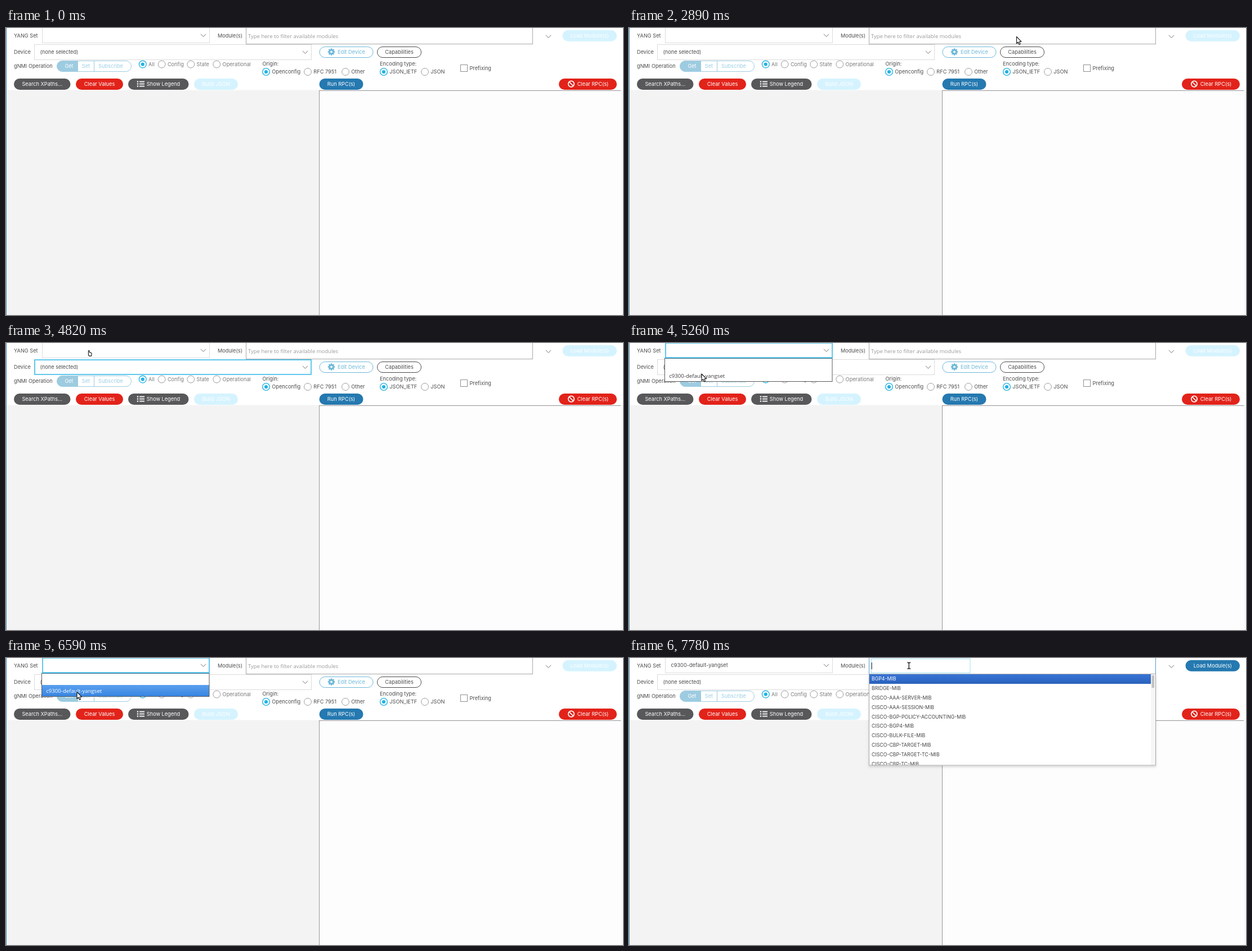
Animation, 1096 px wide and 511 px high, one loop 8 s. Source, as an HTML page with a canvas:

```html
<!DOCTYPE html>
<html lang="en">
<head>
<meta charset="utf-8">
<title>gNMI form</title>
<style>
html, body { margin: 0; width: 100%; height: 100%; overflow: hidden; background: #fff; }
canvas { display: block; }
</style>
</head>
<body>
<canvas id="stage"></canvas>
<script>
const W = 1096, H = 511, LOOP = 8000;
const canvas = document.getElementById('stage');
const ctx = canvas.getContext('2d');
const ratio = window.devicePixelRatio || 1;
canvas.width = W * ratio;
canvas.height = H * ratio;
canvas.style.width = W + 'px';
canvas.style.height = H + 'px';

const UI = '9.2px Inter, sans-serif';
const LIST = '8.75px Inter, sans-serif';
const NATIVE = '9.6px "Open Sans", sans-serif';
const HINT = '9.47px "Open Sans", sans-serif';
const INK = '#4d4d4f', DARK = '#58585b', RED = '#e2231a', BLUE = '#2579b0';
const CYAN = '#4fc3ea', PALE = '#d5f3ff', SOFT = '#6cb8d8', GREY = '#a9a9a9';
const YANG_SET = 'c9300-default-yangset';
const MODULES = ['BGP4-MIB', 'BRIDGE-MIB', 'CISCO-AAA-SERVER-MIB', 'CISCO-AAA-SESSION-MIB',
  'CISCO-BGP-POLICY-ACCOUNTING-MIB', 'CISCO-BGP4-MIB', 'CISCO-BULK-FILE-MIB',
  'CISCO-CBP-TARGET-MIB', 'CISCO-CBP-TARGET-TC-MIB', 'CISCO-CBP-TC-MIB'];

const OPEN = 4970, HOVER = 6450, CHOSEN = 6740, SEARCH = 7780;

// Pointer: start time, shape, hot spot
const POINTER = [
  [0], [2890, arrow, 688.5, 15.5], [3035, arrow, 244, 207], [3180],
  [4520, hand, 165, 38], [4670, hand, 155, 26], [4820, hand, 147, 12.5],
  [5115, arrow, 140, 35], [5260, arrow, 129, 55], [5410, arrow, 126, 60.5],
  [6890], [7180, beam, 491, 6], [7330, beam, 497.3, 13.7]
];

function text(str, x, y, color = INK, font = UI, align = 'left') {
  ctx.font = font;
  ctx.textAlign = align;
  ctx.fillStyle = color;
  ctx.fillText(str, x, y);
}

function rect(x, y, w, h, color) {
  ctx.fillStyle = color;
  ctx.fillRect(x, y, w, h);
}

function frame(x, y, w, h, color, width = 1) {
  ctx.strokeStyle = color;
  ctx.lineWidth = width;
  ctx.strokeRect(x, y, w, h);
}

function line(points, color, width = 1) {
  ctx.beginPath();
  points.forEach(([x, y]) => ctx.lineTo(x, y));
  ctx.strokeStyle = color;
  ctx.lineWidth = width;
  ctx.stroke();
}

function shape(points, x, y, fill, stroke, width = 1) {
  ctx.beginPath();
  points.forEach(([dx, dy]) => ctx.lineTo(x + dx, y + dy));
  ctx.closePath();
  ctx.fillStyle = fill;
  ctx.fill();
  ctx.strokeStyle = stroke;
  ctx.lineWidth = width;
  ctx.lineJoin = 'round';
  ctx.stroke();
  ctx.lineJoin = 'miter';
}

function disc(x, y, r, fill, stroke, width = 1) {
  ctx.beginPath();
  ctx.arc(x, y, r, 0, Math.PI * 2);
  if (fill) { ctx.fillStyle = fill; ctx.fill(); }
  if (stroke) { ctx.strokeStyle = stroke; ctx.lineWidth = width; ctx.stroke(); }
}

function pill(x, y, w, h, fill, stroke) {
  ctx.beginPath();
  ctx.roundRect(x, y, w, h, h / 2);
  if (fill) { ctx.fillStyle = fill; ctx.fill(); }
  if (stroke) { ctx.strokeStyle = stroke; ctx.lineWidth = 1; ctx.stroke(); }
}

function button(label, x, y, w, fill, textX = x + w / 2, align = 'center') {
  pill(x, y, w, 20, fill);
  text(label, textX, y + 12.9, '#fff', UI, align);
}

function gradient(x, y, w, h, top, bottom) {
  const g = ctx.createLinearGradient(0, y, 0, y + h);
  g.addColorStop(0, top);
  g.addColorStop(1, bottom);
  rect(x, y, w, h, g);
}

function chevron(x, y) {
  line([[x - 4.5, y - 2.3], [x, y + 2.5], [x + 4.5, y - 2.3]], '#77777a');
}

function select(x, y, w, h, value, focus) {
  if (focus) frame(x + 0.5, y + 0.5, w - 1, h - 1, CYAN, 1.8);
  else frame(x, y, w, h, '#dcdcdc');
  text(value, x + 10, y + h / 2 + 3.3);
  chevron(x + w - 11, y + h / 2);
}

function radio(label, x, y, on, color = INK) {
  disc(x, y, 6.4, '#fff', on ? '#25b3e6' : '#9b9b9e', on ? 1.4 : 1);
  if (on) disc(x, y, 3.1, '#22b3e6');
  text(label, x + 10.3, y + 3.4, color);
}

function gear(x, y) {
  ctx.save();
  ctx.translate(x, y);
  for (let i = 0; i < 8; i++) {
    ctx.rotate(Math.PI / 4);
    rect(-1.4, -6.2, 2.8, 4, SOFT);
  }
  ctx.restore();
  disc(x, y, 3.3, null, SOFT, 2.4);
}

function arrow(x, y) {
  shape([[0, 0], [0, 12], [2.7, 9.6], [4.6, 14], [6.6, 13.1], [4.8, 8.9], [8.4, 8.6]],
    x, y, '#fff', '#111', 1.1);
}

// Pointing finger on the left, folded knuckles stepping down to the right
function hand(x, y) {
  shape([[-0.6, 5.6], [-0.6, 1.6], [0.2, 0.8], [1.2, 1.6], [1.4, 4.4], [3.6, 4.6], [4.6, 5.2],
    [5.2, 6.2], [4.6, 10.6], [0.6, 10.6], [-0.6, 8.6]], x, y, '#fff', '#111', 1.1);
}

function beam(x, y) {
  const strokes = (color, width) => {
    for (const s of [-1, 1]) {
      line([[-3, 5.5], [-1, 5.5], [0, 4.5], [1, 5.5], [3, 5.5]]
        .map(([dx, dy]) => [x + dx, y + s * dy]), color, width);
    }
    line([[x, y - 5], [x, y + 5]], color, width);
  };
  strokes('#fff', 2.8);
  strokes('#111', 1.3);
}

function topRow(t) {
  const chosen = t >= CHOSEN, search = t >= SEARCH;
  text('YANG Set', 14, 16.7);
  select(64.5, -0.5, 297, 27, chosen ? YANG_SET : '', t >= OPEN && !search);
  text('Module(s)', 376, 17);
  frame(426.5, -0.5, 509, 29, search ? '#5897c9' : GREY);
  if (search) {
    frame(430.5, 1.5, 175.5, 25, '#a3dff2');
    rect(430.7, 8, 1, 12, '#222');
  } else {
    text('Type here to filter available modules', 430, 18, '#9a9a9c', HINT);
  }
  chevron(963.5, 15);
  button('Load Module(s)', 988.5, 3.7, 96.5, chosen ? BLUE : PALE);
}

function deviceRow(t) {
  text('Device', 14, 46.2);
  select(50.5, 29.5, 492, 27, '(none selected)', t >= 4520 && t < OPEN);
  pill(557, 33.5, 95, 19, '#fff', SOFT);
  gear(578, 42.5);
  text('Edit Device', 589, 46.2, SOFT);
  pill(659.5, 33.5, 78, 19, '#fff', '#4a4a4c');
  text('Capabilities', 698.5, 46.2, INK, UI, 'center');
}

function optionRow() {
  text('gNMI Operation', 14, 71.2);
  ctx.save();
  ctx.beginPath();
  ctx.roundRect(90.5, 58.5, 132, 19, 9.5);
  ctx.clip();
  rect(90, 58, 37, 20, '#9dcbe0');
  ctx.restore();
  pill(90.5, 58.5, 132, 19, null, '#9dcbe0');
  line([[127.5, 58], [127.5, 78]], '#9dcbe0');
  line([[156.5, 58], [156.5, 78]], '#9dcbe0');
  text('Get', 112, 71.2, '#fff', UI, 'center');
  text('Set', 142, 71.2, '#9bcfe5', UI, 'center');
  text('Subscribe', 186, 71.2, '#9bcfe5', UI, 'center');

  [['All', 242.8], ['Config', 276.6], ['State', 328.3], ['Operational', 374.3]]
    .forEach(([label, x], i) => radio(label, x, 64.6, !i, '#7b7b7d'));
  text('Origin:', 455.5, 67);
  [['Openconfig', 462], ['RFC 7951', 536], ['Other', 603]]
    .forEach(([label, x], i) => radio(label, x, 78, !i));
  text('Encoding type:', 664, 67);
  [['JSON_IETF', 671], ['JSON', 744]]
    .forEach(([label, x], i) => radio(label, x, 78, !i));
  frame(807.5, 65.5, 12, 12, '#8e8e91');
  text('Prefixing', 823.5, 74.7);
}

function actionRow() {
  button('Search XPaths...', 14, 90, 100.5, DARK);
  button('Clear Values', 124, 90, 84, RED);
  button('Show Legend', 217, 90, 107.5, DARK, 249.8, 'left');
  for (let i = 0; i < 3; i++) {
    rect(232.8, 94.5 + i * 4, 2.4, 2.2, '#fff');
    rect(237, 94.7 + i * 4, 9, 1.8, '#fff');
  }
  button('Build JSON', 334, 90, 78, PALE);
  button('Run RPC(s)', 556.5, 90, 78, BLUE);
  button('Clear RPC(s)', 982, 90, 103, RED, 1014.8, 'left');
  disc(1004, 99.6, 5.2, null, '#fff', 1.7);
  line([[1000.4, 96], [1007.6, 103.2]], '#fff', 1.7);
}

function panels() {
  rect(0, 110.5, W, H, '#f3f3f3');
  rect(1092, 110.5, 4, H, '#f8f8f8');
  rect(556, 111, 536, 400, '#fdfdfd');
  rect(556, 111, 536, 1, '#97979a');
  rect(556, 111, 1, 400, '#97979a');
  rect(0, 0, 1, H, '#3d8fc4');
}

function setMenu(t) {
  if (t < OPEN || t >= CHOSEN) return;
  const over = t >= HOVER;
  rect(63, 27, 299, 42, '#fff');
  if (over) gradient(64, 48, 297, 20.5, '#5aa0ef', '#3785e0');
  frame(63.5, 27.5, 297.5, 41, '#58585a');
  line([[63, 26.6], [362, 26.6]], CYAN, 1.3);
  text(YANG_SET, 71.3, 61.5, over ? '#fff' : '#3c3c3e', NATIVE);
}

function moduleMenu(t) {
  if (t < SEARCH) return;
  ctx.save();
  ctx.shadowColor = 'rgba(0,0,0,.15)';
  ctx.shadowBlur = 4;
  ctx.shadowOffsetY = 2;
  rect(426, 29, 510, 162.5, '#fff');
  ctx.restore();
  ctx.save();
  ctx.beginPath();
  ctx.rect(427, 28, 508, 163);
  ctx.clip();
  gradient(427, 29, 500, 17, '#3874d6', '#2a62bc');
  MODULES.forEach((name, i) => text(name, 431, 40.1 + i * 16.85, i ? '#444446' : '#fff', LIST));
  rect(927, 29, 8, 162, '#f6f6f6');
  rect(928.5, 31, 4.5, 22, '#c2c2c2');
  ctx.restore();
  frame(426.5, 28.5, 509, 162.5, GREY);
}

function draw(t) {
  ctx.setTransform(ratio, 0, 0, ratio, 0, 0);
  rect(0, 0, W, H, '#fff');
  panels();
  topRow(t);
  deviceRow(t);
  optionRow();
  actionRow();
  setMenu(t);
  moduleMenu(t);
  const [, icon, x, y] = POINTER.filter(p => p[0] <= t).pop();
  if (icon) icon(x, y);
}

const start = performance.now();
function tick() {
  draw((performance.now() - start) % LOOP);
  requestAnimationFrame(tick);
}
tick();
</script>
</body>
</html>
```
